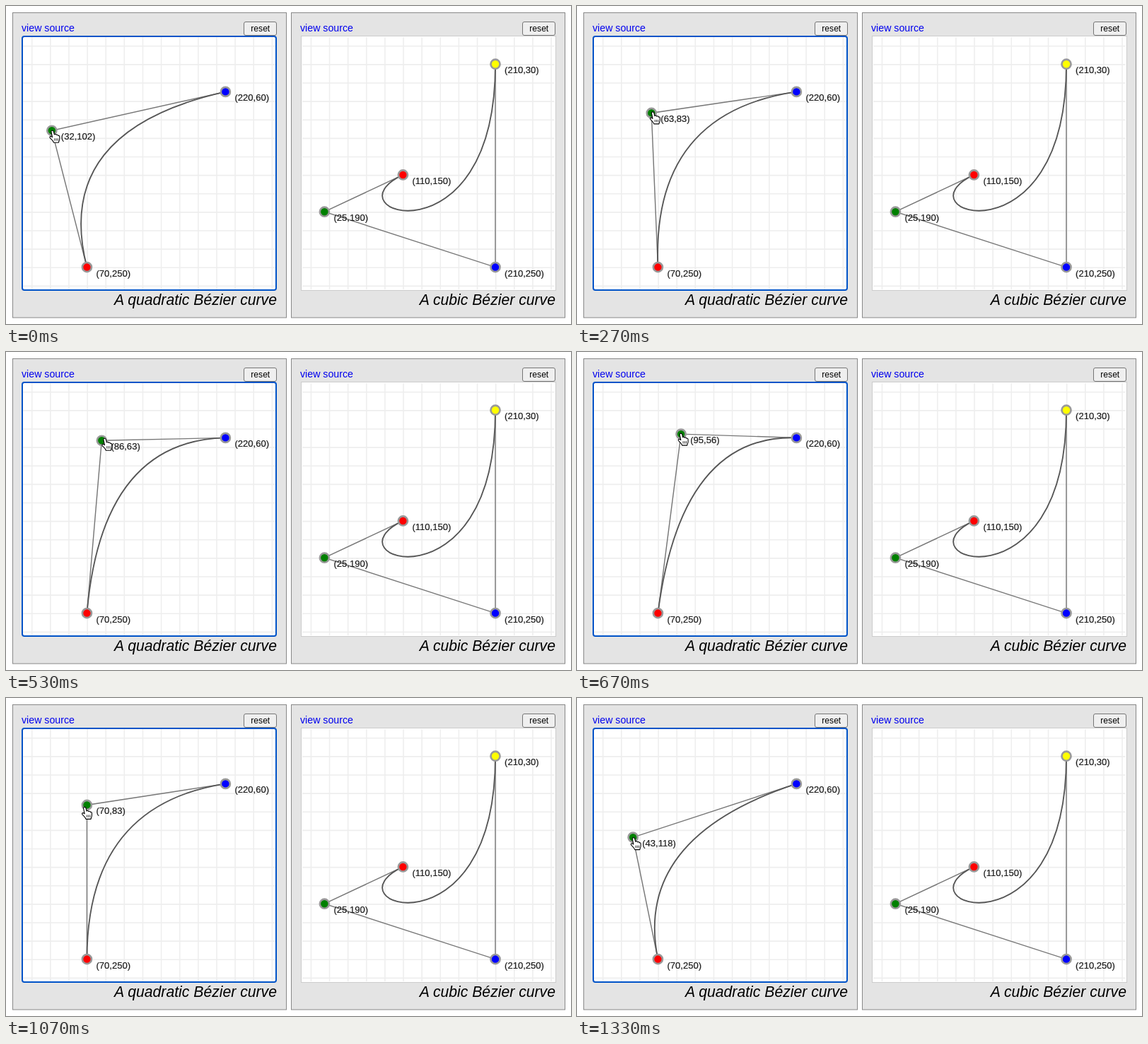
Animation, 799 px wide and 450 px high, one loop 1.39 s. Source, as an HTML page:

```html
<!DOCTYPE html>
<html lang="en">
<head>
<meta charset="utf-8">
<title>Bézier curves</title>
<style>
  html, body { margin: 0; width: 100%; height: 100%; overflow: hidden; background: #fff; }
  svg { display: block; width: 799px; height: 450px; font-family: Arial, "Liberation Sans", sans-serif; }
  .panel { fill: #e4e4e4; stroke: #888; }
  .link { font-size: 14.2px; fill: #00e; }
  .button { fill: #efefef; stroke: #767676; }
  .reset { font-size: 12.1px; text-anchor: middle; }
  .caption { font-size: 21.2px; font-style: italic; text-anchor: end; }
  .grid { fill: none; stroke: #eee; stroke-width: 1.2; }
  .arms { fill: none; stroke: #777; stroke-width: 1.1; }
  .curve { fill: none; stroke: #555; stroke-width: 1.4; }
  .dot { stroke: #999; stroke-width: 2; }
  .label { font-size: 10px; fill: #1c1c1c; stroke: #1c1c1c; stroke-width: .15; }
  .hand { fill: #fff; stroke: #000; stroke-width: 1.1; stroke-linejoin: round; }
</style>
</head>
<body>
<svg id="stage" viewBox="0 0 799 450"></svg>
<script>
const LOOP = 1390, UNIT = 1.3063, TOP = 43;
const stage = document.getElementById('stage');

// time, handle x, handle y, pointer offset x, pointer offset y
const KEYS = [
  [0, 32, 102, 1, 0],
  [270, 63, 83, 2, -1.5],
  [400, 74, 73, 7, -5],
  [600, 92, 58, 3, -2],
  [670, 95, 56, 0, -1],
  [800, 96, 54, 0, 0],
  [870, 96, 54, 0, 0],
  [930, 95, 55, -1, 1],
  [1070, 70, 83, -3, 3],
  [1330, 43, 118, 1, .5]
];

function add(parent, tag, attrs, text) {
  const el = document.createElementNS('http://www.w3.org/2000/svg', tag);
  set(el, attrs);
  if (text) el.textContent = text;
  parent.appendChild(el);
  return el;
}

function set(el, attrs) {
  for (const name in attrs) el.setAttribute(name, attrs[name]);
}

function panel(left, ox, title, focused, colors) {
  add(stage, 'rect', { class: 'panel', x: left, y: 9.5, width: 387, height: 431.5 });
  add(stage, 'text', { class: 'link', x: left + 12.5, y: 35.5 }, 'view source');
  add(stage, 'rect', { class: 'button', x: left + 327, y: 22.5, width: 46, height: 19, rx: 2.5 });
  add(stage, 'text', { class: 'reset', x: left + 350.3, y: 36 }, 'reset');
  add(stage, 'text', { class: 'caption', x: left + 373.5, y: 423 }, title);
  add(stage, 'rect', focused
    ? { x: left + 13.5, y: 43, width: 359, height: 359, rx: 3, fill: '#fff', stroke: '#0053c8', 'stroke-width': 2 }
    : { x: left + 14, y: 42.5, width: 360, height: 360, fill: '#fff', stroke: '#ccc', 'stroke-width': 1 });

  const plot = add(stage, 'g', { transform: `translate(${ox} ${TOP}) scale(${UNIT})` });
  let grid = '';
  for (let p = 10.5; p < 275; p += 20) grid += `M${p} 1V274M1 ${p}H274`;
  add(plot, 'path', { class: 'grid', d: grid });

  const arms = add(plot, 'path', { class: 'arms' });
  const curve = add(plot, 'path', { class: 'curve' });
  const dots = colors.map(fill => add(plot, 'circle', { class: 'dot', r: 5, fill }));
  const labels = colors.map(() => add(plot, 'text', { class: 'label' }));

  return points => {
    const [start, ...rest] = points.map(p => p.join(' '));
    const last = rest.length - 1;
    const lines = last === 1
      ? `M${start}L${rest.join('L')}`
      : `M${start}L${rest[0]}L${rest[last]}L${rest[1]}`;
    set(arms, { d: lines });
    set(curve, { d: `M${start}${last === 1 ? 'Q' : 'C'}${rest.join(' ')}` });
    points.forEach(([x, y], i) => {
      set(dots[i], { cx: x, cy: y });
      set(labels[i], { x: x + 10, y: y + 10 });
      labels[i].textContent = `(${x},${y})`;
    });
  };
}

const drawQuadratic = panel(9.5, 23, 'A quadratic Bézier curve', true, ['red', 'green', 'blue']);
const drawCubic = panel(403.5, 417.7, 'A cubic Bézier curve', false, ['red', 'green', 'yellow', 'blue']);

// Control arms run start, first handle, end point, second handle.
drawCubic([[110, 150], [25, 190], [210, 250], [210, 30]]);
const cubic = stage.querySelectorAll('.dot');
set(cubic[5], { fill: 'blue' });
set(cubic[6], { fill: 'yellow' });
set(stage.querySelectorAll('.arms')[1], { d: 'M110 150L25 190L210 250L210 30' });

const hand = add(stage, 'g', { class: 'hand' });
add(hand, 'path', {
  d: 'M-1.9 1.6C-2-.4 1-.6 1.5 1.3L2.6 5.6C3.4 4.6 5 4.9 5.3 6.2C6.3 5.4 7.7 5.9 7.9 7.2' +
     'C8.9 6.6 10 7.4 10 8.6V11.5C10 13.5 9 14.5 8.6 17H1.6C1 14.5-1 13-3.2 10.8' +
     'C-4.8 9.2-3.4 7.6-1.9 8.4L-.3 9.4Z'
});
add(hand, 'path', { d: 'M3 11v3.4M5.2 11v3.4M7.4 11v3.4', 'stroke-width': .8 });

// The picture holds for about 67 ms, on a 10 ms clock.
const tick = k => Math.round(k * 20 / 3) * 10;

function held(t) {
  let k = 0;
  while (k < 20 && tick(k + 1) <= t) k++;
  return tick(k);
}

function pose(t) {
  let i = 0;
  while (i < KEYS.length - 2 && KEYS[i + 1][0] <= t) i++;
  const a = KEYS[i], b = KEYS[i + 1];
  const f = (t - a[0]) / (b[0] - a[0]);
  return a.map((v, j) => v + (b[j] - v) * f);
}

function draw(t) {
  const [, px, py, dx, dy] = pose(held(t));
  const x = Math.round(px), y = Math.round(py);
  drawQuadratic([[70, 250], [x, y], [220, 60]]);
  set(hand, { transform: `translate(${23 + x * UNIT + dx} ${TOP + y * UNIT + dy})` });
}

const begin = performance.now();
function loop() {
  draw((performance.now() - begin) % LOOP);
  requestAnimationFrame(loop);
}
loop();
</script>
</body>
</html>
```
